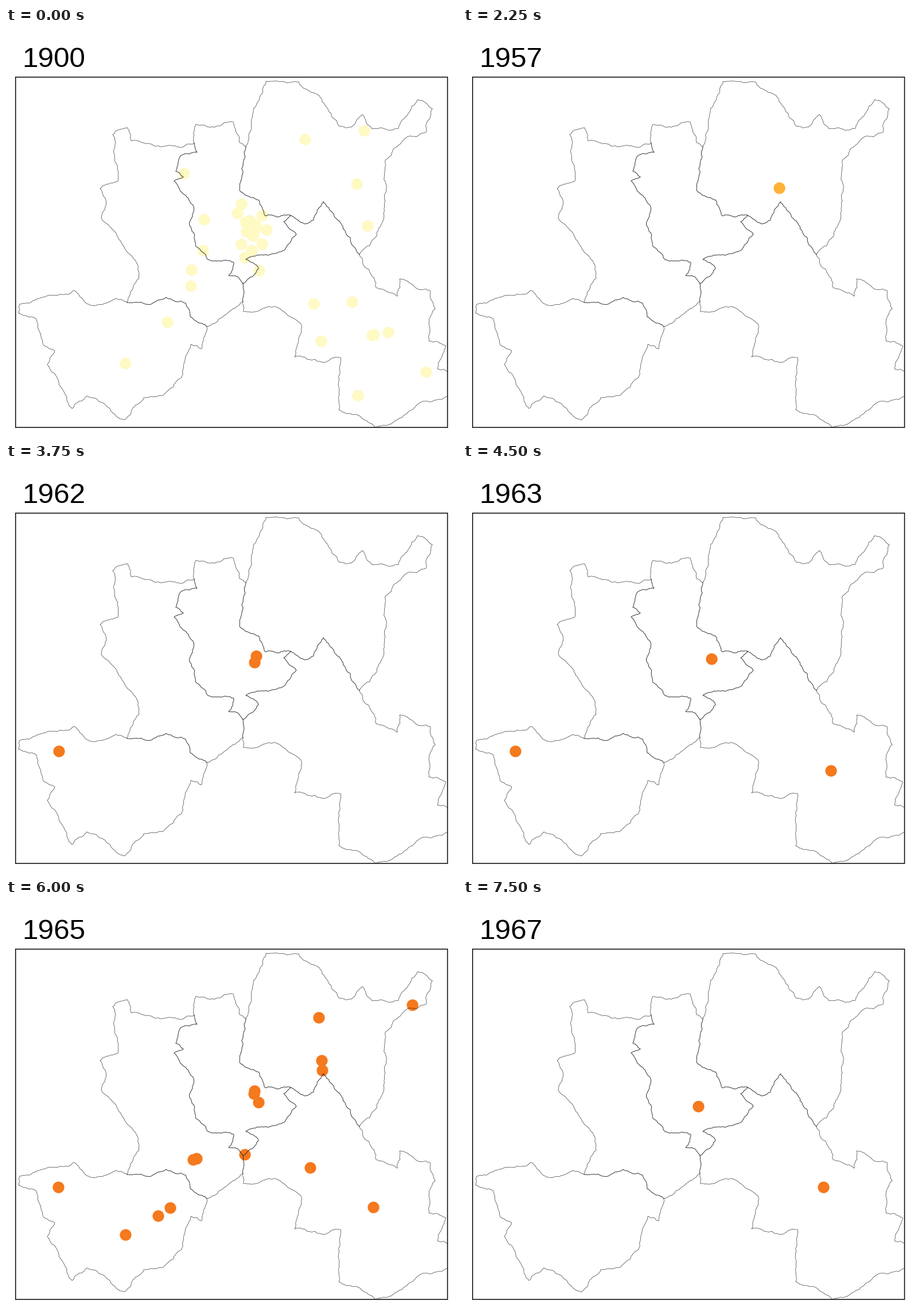
Animation of 786x712 px, one loop 8000 ms. Source, as a matplotlib script:

```python
import numpy as np
import matplotlib.pyplot as plt
from matplotlib.animation import FuncAnimation
from matplotlib.patches import Rectangle

W, H, DPI = 786, 712, 100
PT = 72 / DPI
LOOP, STEP, HOLD = 8000, 250, 750
PALE, AMBER, ORANGE = "#fff9c4", "#fdb237", "#f5791d"

rng = np.random.default_rng(7)
fig = plt.figure(figsize=(W / DPI, H / DPI), dpi=DPI, facecolor="white")
ax = fig.add_axes([0, 0, 1, 1])
ax.set(xlim=(0, W), ylim=(H, 0))
ax.axis("off")
frame = Rectangle((16.7, 85.7), 752.8, 611.3, fill=False, ec="black",
                  lw=1.5 * PT, zorder=4, snap=False)
ax.add_patch(frame)


def roughen(points, step=4, amount=0.13, reach=25):
    """Midpoint displacement until every piece is shorter than step."""
    p = np.array(points, float)
    while True:
        d = np.diff(p, axis=0)
        size = np.hypot(*d.T)
        if size.max() < step:
            return p
        shift = rng.uniform(-amount, amount, len(d)) * np.minimum(1, reach / size)
        shift[size < step] = 0
        normal = np.c_[-d[:, 1], d[:, 0]]
        mid = (p[:-1] + p[1:]) / 2 + shift[:, None] * normal
        out = np.empty((len(p) + len(mid), 2))
        out[::2], out[1::2] = p, mid
        p = out


def border(*points, shared=False):
    x, y = roughen(points).T
    line, = ax.plot(x, y, color="#222222", lw=(0.95 if shared else 0.65) * PT,
                    alpha=0.95, zorder=3, solid_joinstyle="round")
    line.set_clip_path(frame)


# Junctions where borders meet
A, B, C, D = (211, 479), (350, 521), (413, 477), (413, 446)
E, F, G, K = (328, 201), (418, 207), (496, 327), (616, 395)

# Outer borders, district by district
border(B, (341, 560), (322, 552), (305, 611), (275, 640), (240, 645),
       (206, 684), (172, 656), (141, 642), (115, 664), (90, 612), (72, 587),
       (85, 564), (64, 550), (53, 508), (22, 498), (24, 482), (56, 472),
       (119, 458), (148, 484), (192, 472), A)
border(A, (232, 437), (225, 405), (186, 352), (166, 331), (174, 300),
       (164, 280), (195, 267), (186, 186), (212, 174), (218, 197), (258, 206),
       (308, 208), E)
border(B, (378, 504), C)
border(E, (331, 168), (364, 173), (396, 164), (407, 200), F)
border(F, (437, 132), (453, 93), (510, 94), (541, 115), (568, 155), (582, 172),
       (602, 173), (621, 151), (638, 176), (684, 175), (717, 125), (743, 141),
       (732, 182), (697, 192), (661, 231), (663, 275), (653, 345), (634, 380), K)
border(K, (645, 453), (682, 468), (686, 438), (739, 458), (748, 490),
       (737, 515), (737, 546), (766, 554), (752, 595), (770, 600))
border((770, 643), (725, 652), (677, 686), (644, 697), (612, 675), (580, 666),
       (583, 575), (550, 583), (503, 574), (515, 519), (498, 505), (470, 486),
       (414, 495), C)

# Borders between two districts
border(A, (243, 482), (279, 470), (313, 480), (321, 504), B, shared=True)
border(E, (333, 217), (306, 222), (296, 250), (309, 260), (293, 267),
       (314, 293), (327, 312), (320, 345), (331, 381), (352, 404), (382, 405),
       (397, 409), (388, 432), (405, 435), D, shared=True)
border(D, C, shared=True)
border(F, (411, 245), (407, 283), (440, 300), (452, 328), G, shared=True)
border(G, (484, 338), (506, 360), (480, 390), (418, 404), (440, 420), D,
       shared=True)
border(G, (520, 342), (536, 335), (553, 303), (600, 366), K, shared=True)


def city():
    """Crowded core with an arc of suburbs to its east and south."""
    core = rng.normal((428, 346), (8, 7), (14, 2))
    a = np.radians(np.arange(-45, 136, 45))
    arc = np.c_[428 + 26 * np.cos(a), 352 + 36 * np.sin(a)]
    return [*core, *arc]


dots_1900 = city() + [
    (410, 307), (403, 323), (416, 400), (441, 423), (310, 254), (345, 334),
    (343, 388), (323, 422), (322, 450), (281, 513), (208, 585), (521, 194),
    (624, 179), (611, 272), (630, 345), (536, 481), (603, 478), (549, 546),
    (638, 536), (641, 535), (666, 531), (732, 600), (613, 641)]
dots_1964 = [
    (497, 170), (521, 194), (471, 210), (255, 254), (277, 298), (239, 321),
    (436, 316), (482, 314), (510, 348), (428, 363), (292, 432), (368, 432),
    (327, 455), (329, 460), (297, 465), (303, 468), (91, 501), (168, 532),
    (309, 537), (238, 645), (646, 454), (602, 490), (564, 529), (640, 536)]
dots_1965 = [
    (708, 183), (545, 205), (550, 280), (551, 297), (433, 333), (432, 338),
    (440, 353), (326, 453), (332, 451), (416, 444), (530, 467), (91, 501),
    (286, 537), (265, 551), (208, 584), (640, 536)]

years = {
    1900: dots_1900,
    1954: [(403, 267)],
    1955: [(431, 346)],
    1957: [(551, 279)],
    1958: [(710, 183), (327, 455)],
    1962: [(436, 335), (433, 346), (92, 501)],
    1963: [(433, 340), (91, 501), (641, 535)],
    1964: dots_1964,
    1965: dots_1965,
    1966: [(432, 340)],
    1967: [(410, 360), (628, 501)],
}

title = ax.text(28.5, 68, "", family="Liberation Sans", size=49.5 * PT,
                color="black", va="baseline")
dots = ax.scatter([], [], s=(20.2 * PT) ** 2, linewidths=0, zorder=2)


def shade(year):
    return PALE if year < 1950 else AMBER if year < 1960 else ORANGE


def update(i):
    year = list(years)[i * STEP // HOLD]
    title.set_text(str(year))
    dots.set_offsets(years[year])
    dots.set_facecolor(shade(year))
    return title, dots


anim = FuncAnimation(fig, update, frames=LOOP // STEP, interval=STEP,
                     repeat=True, repeat_delay=0, blit=False)
plt.show()
```
